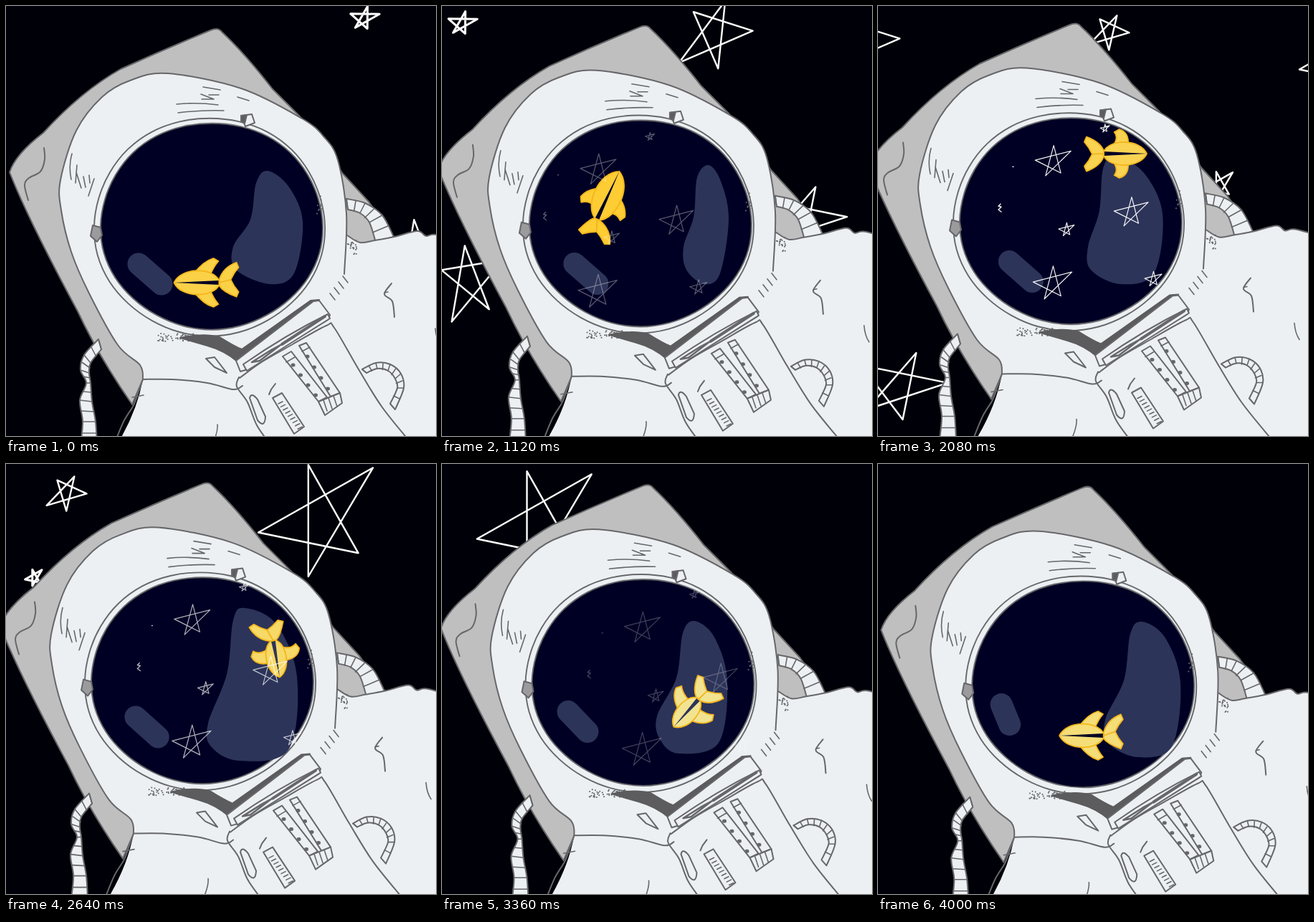
Animation, 600 px wide and 600 px high, one loop 4.08 s. Source, as an HTML page:

```html
<!DOCTYPE html>
<html lang="en">
<head>
<meta charset="utf-8">
<title>Goldfish in space</title>
<style>
  html, body { margin: 0; width: 100%; height: 100%; overflow: hidden; background: #000008; }
  svg { display: block; width: 100vw; height: 100vh; }
  path { stroke-linejoin: round; stroke-linecap: round; }
</style>
</head>
<body>
<svg viewBox="0 0 600 600">
  <rect width="600" height="600" fill="#000008"/>
  <g id="sky"></g>
  <g id="suit"></g>
  <g id="glass"></g>
  <g id="fish"></g>
  <g id="reflections"></g>
</svg>
<script>
const FRAMES = 51, STEP = 80, TAU = Math.PI * 2;
const INK = '#67676a', DARK = '#5c5c5e', WHITE = '#ecf0f3', GRAY = '#bfbfbf', GLARE = '#2d3459';
const [sky, suit, glass, fish, reflections] =
  ['sky', 'suit', 'glass', 'fish', 'reflections'].map(id => document.getElementById(id));

const mix = (a, b, t) => a + (b - a) * t;
const wave = (frame, peak, cycles = 1) => Math.cos(TAU * cycles * (frame - peak) / FRAMES);
const times = (n, make) => Array.from({ length: n }, (_, i) => make(i));
const set = (el, attrs) => { for (const name in attrs) el.setAttribute(name, attrs[name]); };
const place = (el, x, y, turn = 0) => set(el, { transform: `translate(${x} ${y}) rotate(${turn})` });

let seed = 7;
const rand = () => (seed = seed * 16807 % 2147483647) / 2147483647;

function add(parent, d, fill = 'none', stroke = INK, width = 2) {
  const el = document.createElementNS('http://www.w3.org/2000/svg', 'path');
  set(el, { d, fill, stroke, 'stroke-width': width });
  parent.append(el);
  return el;
}

const parse = text => text.split(' ').map(pair => pair.split(',').map(Number));

// Smooth curve through points
function smooth(pts, closed) {
  const n = pts.length;
  const get = i => closed ? pts[(i + n) % n] : pts[Math.max(0, Math.min(n - 1, i))];
  let d = 'M' + pts[0];
  for (let i = 0; i < (closed ? n : n - 1); i++) {
    const [a, b, c, e] = [get(i - 1), get(i), get(i + 1), get(i + 2)];
    const c1 = b.map((v, k) => v + (c[k] - a[k]) / 6);
    const c2 = c.map((v, k) => v - (e[k] - b[k]) / 6);
    d += `C${c1} ${c2} ${c}`;
  }
  return d + (closed ? 'Z' : '');
}
const curve = (text, width = 2) => add(suit, smooth(parse(text)), 'none', INK, width);
const lines = (d, width = 1.6) => add(suit, d, 'none', INK, width);
const block = (d, fill = WHITE, stroke = INK) => add(suit, d, fill, stroke);

// Ellipse with a slightly unsteady hand
function oval(cx, cy, rx, ry, fill) {
  const pts = times(24, i => {
    const a = TAU * i / 24, r = 1 + .005 * Math.sin(5 * a);
    return [cx + rx * r * Math.cos(a), cy + ry * r * Math.sin(a)];
  });
  add(suit, smooth(pts, true), fill, INK, 1.9);
}

function speckle(x, y, w, h, count) {
  lines(times(count, () => `M${x + rand() * w} ${y + rand() * h}h.1`).join(''), 2);
}

// Evenly spaced short strokes; each one moves on by (dx, dy)
const hatch = (n, x, y, dx, dy, stroke, width) =>
  lines(times(n, i => `M${x + i * dx} ${y + i * dy}${stroke}`).join(''), width);

// Ribbed hose between two rails
function hose(outer, inner) {
  const a = parse(outer), b = parse(inner);
  block(smooth(a) + 'L' + smooth([...b].reverse()).slice(1) + 'Z');
  const between = (pts, i, t) => pts[i].map((v, k) => mix(v, pts[i + 1][k], t));
  for (let i = 0; i < a.length - 1; i++)
    for (const t of [0, .5]) lines(`M${between(a, i, t)}L${between(b, i, t)}`);
}

function drawSuit() {
  // Backpack
  block('M5 232Q13 207 52 177Q105 119 160 88Q220 61 285 34Q296 29 301 36Q333 66 372 116L410 154L470 234L506 273L541 323L400 400L191 521L176 556Q130 490 100 426Q30 296 5 232Z', GRAY);
  curve('53,198 54,214 48,231 32,240 26,250 31,271');

  // Hoses
  hose('475,269 501,275 525,292 541,322', '477,284 494,289 507,302 516,330');
  hose('129,465 109,487 104,508 112,526 103,550 107,580 104,612', '133,479 118,498 116,512 118,526 120,552 125,580 127,612');

  // Body
  const shoulder = '476,320 494,330 515,327 542,322 574,314 586,321 600,319 640,330';
  block(smooth(parse(shoulder)) + 'V620H150Q182 570 191 521L300 420Z', WHITE, 'none');
  curve(shoulder);
  curve('191,521 185,538 178,557 164,580 150,614');

  // Helmet
  const rim = '191,521 187,501 156,473 116,401 91,343 77,285 76,243 98,174 134,127 173,104 225,94 328,115 413,157 444,183 463,215 475,290 472,374';
  block(smooth(parse(rim)) + 'L440 430L330 530Z', WHITE, 'none');
  curve(rim);
  curve('191,521 232,521 281,526 317,535 330,530');
  lines('M176 546L192 543M275 113l24 4M283 124h14M272 123l18 7M273 130h17M238 137q28 -3 58 1M240 149q32 -4 64 -3M323 127l16 5');
  lines('M92 206q-5 17 -1 36M99 222l-2 25M98 232l7 22M108 238l3 15M116 236l1 11M123 241l-8 24');
  oval(284, 308, 161, 152, 'none');
  oval(287, 307, 155, 144, '#000024');
  block('M328 153L343 151L347 163L334 168Z');
  block('M328 153L336 152L333 164L328 161Z', DARK);
  block('M121 306L132 309L134 320L127 329L118 321Z', '#9b9b9d');
  speckle(434, 264, 7, 28, 13);
  speckle(476, 326, 14, 22, 22);
  speckle(212, 457, 55, 11, 55);
  hatch(4, 470, 377, -6, 8, 'l7 9');

  // Collar
  block('M243 463Q276 456 298 462Q319 475 329 479L425 411L437 410L324 497Q306 481 281 474Z', DARK, DARK);
  block('M321 495L429 412L437 411L452 431L449 438L334 508L327 510Z');
  block('M331 500Q390 459 449 430L452 436L336 509Z');
  lines('M343 497L370 480L383 473L354 495Z', 2.5);
  lines('M385 472L445 433', 4);
  block('M279 492L291 490L308 512L291 504Z');

  // Chest panel
  curve('325,518 322,531 337,553 350,585 369,612');
  curve('326,519 358,496 400,472 447,446 458,449 492,507 525,560 567,612');
  block('M340 547Q342 538 351 549L362 573Q361 590 351 578Z');
  lines('M376 527L370 535L367 542', 2);
  block('M372 547L385 540L416 587L402 597Z');
  hatch(9, 380, 555, 3.4, 4.4, 'l6 -3');
  block('M386 489L398 482L448 546L436 552ZM409 474L419 470L466 540L453 545Z');
  block('M436 552L466 540L469 554L445 571Z');
  hatch(3, 443, 550, 7, -3, 'l5 15');
  lines('M391 497l12 -7M413 482l11 -6');
  hatch(4, 400, 501, 10.5, 14, 'h1', 5);
  hatch(4, 420, 489, 9.5, 15, 'h1', 5);

  // Side loop and creases
  hose('497,507 516,498 536,500 551,513 555,533 543,563', '503,512 518,506 533,509 543,520 546,533 536,555');
  curve('538,387 528,402 539,412 542,434');
  lines('M528 400l5 -1M599 450q1 14 7 23M295 584q1 9 -6 26');
}

// One hand-drawn star gesture, reused at every size and tilt
const gesture = parse('-.1,-.9 .75,.6 -.95,.25 1,-.85 -.1,1');
function star(parent, x, y, size, tilt, width) {
  const a = tilt * Math.PI / 180, c = Math.cos(a), s = Math.sin(a);
  const pts = gesture.map(([u, v]) => [x + size * (u * c - v * s), y + size * (u * s + v * c)]);
  return add(parent, `M${pts.join('L')}Z`, 'none', '#fff', width);
}

// frame on which it stands at x, y; size, tilt; speed, sink
const stars = [
  [7, 262, 19, 18, 30, 33.7, .5],
  [14, 385, 42, 50, 186, 33.6, .9],
  [7, 476, 228, 17, 114, 33.6, 0],
  [14, 45, 383, 50, 159, 38.4, 2.6],
  [26, 25, 525, 55, 41, 39, 19.3],
  [26, 325, 38, 26, 193, 34, .6],
  [26, 474, 250, 21, 0, 33.6, 0],
  [33, 38, 158, 12, 0, 33.6, 0],
  [33, 430, 75, 82, 0, 33.7, 1]
].map(([key, x, y, size, tilt, speed, sink]) =>
  ({ key, speed, sink, el: star(sky, x, y, size, tilt, size < 20 ? 3 : 2.4) }));

drawSuit();
const bigGlare = add(glass, '', GLARE, 'none');
const smallGlare = add(glass, '', 'none', GLARE, 31);
const fishParts = times(4, () => add(fish, '', '', '#f3b61b', 1.8));

for (const [x, y, size] of [[242, 215, 23], [351, 286, 22], [241, 385, 25], [262, 311, 10], [383, 380, 11], [316, 170, 6]])
  star(reflections, x, y, size, 15, 1.2);
add(reflections, 'M171 276l-3 3l4 1l-4 4l4 3M188 224h1', 'none', '#fff', 1.4);

// frame, top x y, right edge, bottom x y, left edge
const glareKeys = [
  [0, 365, 230, 414, 368, 388, 317],
  [7, 360, 214, 409, 368, 397, 327],
  [14, 372, 222, 400, 366, 388, 337],
  [26, 330, 210, 397, 338, 388, 293],
  [33, 333, 201, 406, 325, 414, 282],
  [42, 352, 219, 398, 330, 404, 300],
  [50, 368, 220, 422, 362, 409, 317]
];
// frame, x, y, heading, paleness
const swimKeys = [
  [0, 268, 386, 180, .3],
  [7, 220, 337, 244, 0],
  [14, 231, 266, 295, .1],
  [26, 343, 206, 360, .4],
  [33, 377, 270, 440, .6],
  [42, 342, 346, 492, 1],
  [50, 286, 379, 540, .75]
];

// Cubic interpolation between the rows around a frame
function sample(keys, frame) {
  const row = i => keys[Math.max(0, Math.min(keys.length - 1, i))];
  const i = Math.max(0, keys.findIndex(k => k[0] >= frame) - 1);
  const [a, b, c, d] = [row(i - 1), row(i), row(i + 1), row(i + 2)];
  const span = c[0] - b[0], t = (frame - b[0]) / span;
  return b.map((v, k) => {
    const m0 = (c[k] - a[k]) / (c[0] - a[0]) * span;
    const m1 = (d[k] - v) / (d[0] - b[0]) * span;
    return v + m0 * t + (3 * (c[k] - v) - 2 * m0 - m1) * t * t + (2 * (v - c[k]) + m0 + m1) * t ** 3;
  }).slice(1);
}

function drawGlare(frame) {
  const [tx, ty, right, bx, by, left] = sample(glareKeys, frame);
  set(bigGlare, { d: smooth([
    [tx, ty], [mix(tx, right, .6), ty + 22], [right, mix(ty, by, .45)], [right - 12, by - 15], [bx, by],
    [left + 4, by - 20], [left, by - 52], [mix(left, tx - 16, .75), mix(ty, by, .43)], [tx - 16, ty + 17]
  ], true) });

  const t = frame / FRAMES, reach = 16 - 12 * t ** 8;
  const x = 201 - 25 * t ** 4, y = 374 - 26 * t ** 3;
  set(smallGlare, { d: `M${x - reach} ${y - 14}L${x + reach} ${y + 14}` });
}

function drawFish(frame) {
  const [x, y, heading, pale] = sample(swimKeys, frame);
  const len = 33 + 6 * wave(frame, 12), w = len / 2;
  const sweep = -14 - 8 * wave(frame, 3), wag = 2 + 5 * wave(frame, 14, 3);
  const base = 4 - len, tip = -len - 20;
  const fin = s => `M6 ${s * w * .75}Q${sweep + 14} ${s * 30} ${sweep} ${s * 34}L${sweep - 7} ${s * 30}` +
    `Q${sweep} ${s * 22} ${-len * .5} ${s * w * .6}Z`;
  const lobe = s => `Q${base - 5} ${wag + s * 17} ${tip} ${wag + s * 24}L${tip - 3} ${wag + s * 17}Q${tip + 4} ${wag + s * 9} ${tip + 8} ${wag}`;
  const side = s => `C${len * .7} ${s * w * 1.3} ${-len * .6} ${s * w * 1.3} ${base} ${s * 3}`;
  const paths = [
    fin(1), fin(-1),
    `M${base} 4${lobe(1)}L${base} 0ZM${base} -4${lobe(-1)}L${base} 0Z`,
    `M${len} 0${side(1)}L${base} -3M${len} 0${side(-1)}L${base} 3`
  ];
  const fill = `rgb(${[mix(255, 242, pale), mix(201, 227, pale), mix(40, 145, pale)].map(Math.round)})`;
  fishParts.forEach((el, i) => set(el, { d: paths[i], fill }));
  place(fish, x, y, heading);
}

function draw(frame) {
  const drift = Math.min(frame, FRAMES - frame);
  place(suit, -.72 * drift, -.3 * drift);
  for (const { key, speed, sink, el } of stars) place(el, speed * (key - frame), sink * (frame - key));
  drawGlare(frame);
  drawFish(frame);
  place(reflections, 2.2 * (frame - 26), .06 * (frame - 28) ** 2);
  set(reflections, { opacity: Math.max(0, 1 - Math.abs(frame - 27) / 20) });
}

const start = performance.now();
function tick() {
  draw(Math.floor((performance.now() - start) / STEP) % FRAMES);
  requestAnimationFrame(tick);
}
tick();
</script>
</body>
</html>
```
